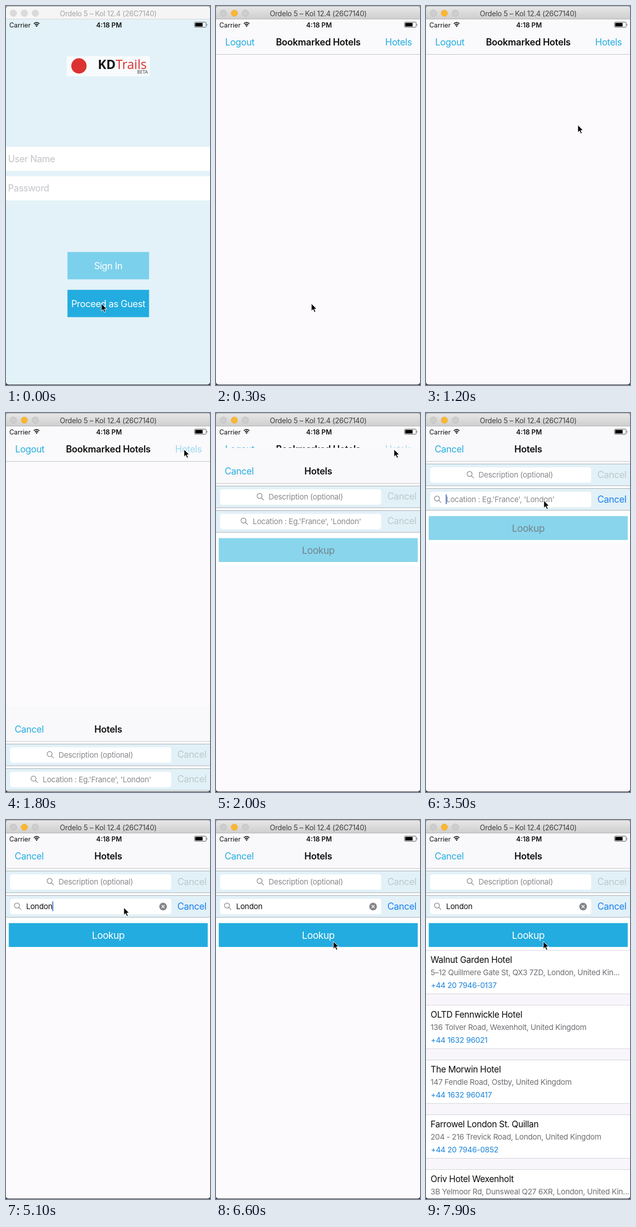
Recreate the animation shown at these times as an HTML page. Size 400 by 740 pixels, loop 8 s.

```html
<!DOCTYPE html>
<html lang="en">
<head>
<meta charset="utf-8">
<title>Hotel search</title>
<style>
html, body { margin: 0; width: 100%; height: 100%; overflow: hidden; background: #3b3d40; }
svg { display: block; width: 400px; height: 740px; }
text { font: 18.1px Inter, sans-serif; letter-spacing: -.022em; white-space: pre; }
.mid { text-anchor: middle; }
.bar { font-size: 14px; letter-spacing: -.016em; }
.status { font-size: 12.8px; letter-spacing: 0; fill: #111; }
.time { font-size: 13px; font-weight: 600; }
.bold { font-weight: 600; letter-spacing: -.016em; fill: #111; }
.link { fill: #25aee2; }
.hint { fill: #c4c4ca; }
.white { fill: #fff; }
.search { font-size: 14.93px; letter-spacing: -.018em; fill: #88898d; }
.off { fill: #bcc8ce; }
.look { font-size: 19.2px; letter-spacing: -.03em; }
.name { font-size: 17.07px; letter-spacing: -.021em; fill: #0c0c0c; }
.addr { font-size: 14.93px; letter-spacing: -.018em; fill: #6e6e73; }
.phone { font-size: 14.93px; letter-spacing: -.015em; fill: #1a84da; }
.logo { font: 25px "Open Sans", sans-serif; letter-spacing: 0; }
.beta { font: 9px "Open Sans", sans-serif; letter-spacing: 0; fill: #333; }
</style>
</head>
<body>
<svg viewBox="0 0 400 740">
  <defs>
    <linearGradient id="chrome" x2="0" y2="1">
      <stop stop-color="#e9e8e9"/><stop offset="1" stop-color="#d0cfd0"/>
    </linearGradient>
    <clipPath id="win"><rect y="1" width="400" height="738" rx="5"/></clipPath>
    <g id="glass" fill="none" stroke="#7f8388" stroke-width="1.2" stroke-linecap="round">
      <circle cx="-1.5" cy="-1.5" r="4.9"/><path d="M2.2 2.2 6.3 6.3"/>
    </g>
    <g id="searchbar">
      <rect width="400" height="43" fill="#e2f1f7"/>
      <path d="M0 .5H400M0 43H400" stroke="#a3acb1"/>
      <rect x="8" y="7" width="316" height="30" rx="4.5" fill="#fff"/>
    </g>
  </defs>
  <rect width="400" height="3" fill="#a9a9aa"/>
  <g clip-path="url(#win)">
    <g id="login">
      <rect width="400" height="740" fill="#e3f2f8"/>
      <rect x="119" y="98" width="163" height="39" fill="#f8fbfd"/>
      <circle cx="143" cy="117" r="15" fill="#dc3131"/>
      <text class="logo" x="180" y="123"><tspan font-weight="700" fill="#161616">KD</tspan><tspan fill="#d9302f">Trails</tspan></text>
      <text class="beta" x="257" y="132">BETA</text>
      <path d="M0 275H400V322H0ZM0 332.500H400V379.500H0Z" fill="#fff"/>
      <text class="hint" x="4" y="305">User Name</text>
      <text class="hint" x="4" y="361.500">Password</text>
      <rect x="120.500" y="480.400" width="160" height="53.300" fill="#7bd0eb"/>
      <rect x="120.500" y="554.200" width="160" height="53.300" fill="#23ace0"/>
      <text class="mid white" x="200.500" y="513.500">Sign In</text>
      <text class="mid white" x="200.500" y="587.500">Proceed as Guest</text>
    </g>
    <g id="saved">
      <rect width="400" height="740" fill="#fcfafd"/>
      <rect width="400" height="94" fill="#faf9fb"/>
      <path d="M0 94.500H400" stroke="#c3c2c6"/>
      <text class="link" x="18" y="77">Logout</text>
      <text class="mid bold" x="200.500" y="77">Bookmarked Hotels</text>
      <text class="link" id="open" x="384" y="77" text-anchor="end">Hotels</text>
    </g>
    <g id="modal">
      <rect y="25" width="400" height="715" fill="#fcfafd"/>
      <rect y="25" width="400" height="70" fill="#f9f8fa"/>
      <rect y="95" width="400" height="159" fill="#fff"/>
      <path d="M0 94.500H400" stroke="#c3c2c6"/>
      <text class="link" x="17" y="77">Cancel</text>
      <text class="mid bold" x="200.500" y="77">Hotels</text>
      <use href="#searchbar" y="99"/>
      <use href="#glass" x="87" y="120.500"/>
      <text class="search" x="103" y="126">Description (optional)</text>
      <text class="off" x="336" y="126.500">Cancel</text>
      <use href="#searchbar" y="147"/>
      <g id="place">
        <use href="#glass" x="23" y="168.500"/>
        <text class="search" id="hint" x="39.500" y="174">Location : Eg.'France', 'London'</text>
      </g>
      <text class="search" id="typed" x="39.500" y="174" style="fill:#111"></text>
      <rect id="caret" y="159" width="1.800" height="19" fill="#3f6fc4"/>
      <g id="clear">
        <circle cx="308" cy="169" r="7.500" fill="#85868a"/>
        <path d="m305.200 166.200 5.600 5.600m0-5.600-5.600 5.600" stroke="#fff" stroke-width="1.300"/>
      </g>
      <text id="stop" x="336" y="174.500">Cancel</text>
      <rect id="button" x="5.400" y="201.300" width="390.200" height="46.600"/>
      <text class="mid look" id="lookup" x="200.500" y="232">Lookup</text>
      <g id="list"></g>
    </g>
    <g id="status">
      <text class="status" x="6.500" y="41.500">Carrier</text>
      <path d="M54.500 34.700Q60 29.700 65.500 34.700M56.700 37Q60 34 63.300 37" fill="none" stroke="#111" stroke-width="1.700"/>
      <path d="M58 38.600Q60 37 62 38.600L60 40.800Z"/>
      <text class="status time mid" x="202" y="41.500">4:18 PM</text>
      <rect x="369.500" y="31.500" width="23" height="10" rx="2" fill="none" stroke="#555"/>
      <rect x="371" y="33" width="14.500" height="7" rx=".5"/>
      <path d="M394 34.500q1.600 2 0 4Z" fill="#333"/>
    </g>
    <rect id="titlebar" width="400" height="25"/>
    <path id="edge" d="M0 25.500H400" stroke="#b3b2b3"/>
    <g stroke-width=".8" id="lights">
      <circle cx="14.500" cy="14" r="6.300"/><circle cx="36" cy="14" r="6.300"/><circle cx="57.500" cy="14" r="6.300"/>
    </g>
    <text class="bar mid" id="title" x="200.500" y="19.500">Ordelo 5 – Kol 12.4 (26C7140)</text>
  </g>
  <path id="mouse" d="M0 0V14.500L3.400 11.400 5.800 17 8.300 15.900 5.900 10.500H10.500Z" stroke="#fff"/>
</svg>
<script>
const LOOP = 8000, STEP = 100;
const WORD = 'London';
const ACTIVE = 100, ENTER = 200, TAP = 1650, RISE = 1749, FOCUS = 3100;
const TYPE = 3900, KEY_GAP = 170, SUBMIT = 6400, RESULTS = 6700;

const hotels = [
  ['Walnut Garden Hotel', '5–12 Quillmere Gate St, QX3 7ZD, London, United Kin...', '+44 20 7946-0137'],
  ['OLTD Fennwickle Hotel', '136 Tolver Road, Wexenholt, United Kingdom', '+44 1632 96021'],
  ['The Morwin Hotel', '147 Fendle Road, Ostby, United Kingdom', '+44 1632 960417'],
  ['Farrowel London St. Quillan', '204 - 216 Trevick Road, London, United Kingdom', '+44 20 7946-0852'],
  ['Oriv Hotel Wexenholt', '3B Yelmoor Rd, Dunsweal Q27 6XR, London, United Kin...', '+44 20 7946-0264']
];

// Pointer stops: time, x, y
const stops = [
  [0, 187, 581], [700, 187, 581], [1500, 349, 71], [2400, 349, 71],
  [3000, 231, 171], [5600, 231, 171], [6200, 230, 237], [LOOP, 230, 237]
];

const $ = id => document.getElementById(id);
const set = (id, attrs) => {
  for (const k in attrs) $(id).setAttribute(k, attrs[k]);
};
const show = (id, on) => { $(id).style.display = on ? '' : 'none'; };
const clamp = v => Math.min(1, Math.max(0, v));
const ease = v => v * v * (3 - 2 * v);

$('list').innerHTML = '<rect y="254" width="400" height="486" fill="#f8f6fa"/>' +
  hotels.map(([name, addr, phone], i) => `<g transform="translate(0 ${254 + i * 107})">
    <rect width="400" height="85.500" fill="#fff"/>
    <path d="M0 .5H400M0 85.500H400" stroke="#d4d3d7"/>
    <text class="name" x="9" y="25">${name}</text>
    <text class="addr" x="9" y="48.500">${addr}</text>
    <text class="phone" x="9.500" y="74">${phone}</text></g>`).join('');

function pointer(t) {
  const i = stops.findIndex(s => s[0] > t);
  const [t0, x0, y0] = stops[i - 1], [t1, x1, y1] = stops[i];
  const p = ease((t - t0) / (t1 - t0));
  return [x0 + (x1 - x0) * p, y0 + (y1 - y0) * p];
}

// Critically damped spring: distance still to travel
function slide(t) {
  const w = Math.max(0, t - RISE) * .018;
  return 714 * (1 + w) * Math.exp(-w);
}

function drawWindow(active) {
  set('titlebar', { fill: active ? 'url(#chrome)' : '#f6f5f6' });
  set('edge', { stroke: active ? '#b3b2b3' : '#d6d6d7' });
  set('title', { fill: active ? '#404040' : '#a5a4a6' });
  [...$('lights').children].forEach((dot, i) => {
    const lit = active && i === 1;
    dot.setAttribute('fill', lit ? '#fab732' : active ? '#cfcecf' : '#dcdbdc');
    dot.setAttribute('stroke', lit ? '#ebae3a' : active ? '#b9b8b9' : '#d0cfd0');
  });
}

function drawSearch(t) {
  const count = Math.min(WORD.length, Math.max(0, Math.floor((t - TYPE) / KEY_GAP) + 1));
  const focused = t >= FOCUS;
  set('place', { transform: `translate(${32.5 * (1 - ease(clamp((t - FOCUS) / 250)))} 0)` });
  show('hint', !count);
  show('clear', count);
  $('typed').textContent = WORD.slice(0, count);
  set('stop', { fill: focused ? '#1a80ee' : '#bcc8ce' });
  set('button', { fill: count ? '#23ace0' : '#88d5ec' });
  set('lookup', { fill: count ? '#fff' : '#75858c' });

  const since = t - (count ? TYPE + (count - 1) * KEY_GAP : FOCUS);
  const blink = focused && t < SUBMIT && since % 1000 < 550;
  show('caret', blink);
  if (blink) set('caret', { x: 38.7 + (count ? $('typed').getComputedTextLength() + .6 : 0) });
}

function render(t) {
  drawWindow(t >= ACTIVE);
  show('login', t < ENTER);
  show('saved', t >= ENTER);
  show('modal', t >= RISE);
  show('list', t >= RESULTS);
  set('open', { opacity: t >= TAP ? .42 : 1 });
  set('modal', { transform: `translate(0 ${slide(t).toFixed(2)})` });
  drawSearch(t);
  set('mouse', { transform: `translate(${pointer(t).map(v => v.toFixed(2))})` });
}

function tick() {
  const t = performance.now() % LOOP;
  render(Math.floor(t / STEP) * STEP);
  requestAnimationFrame(tick);
}
tick();
</script>
</body>
</html>
```
